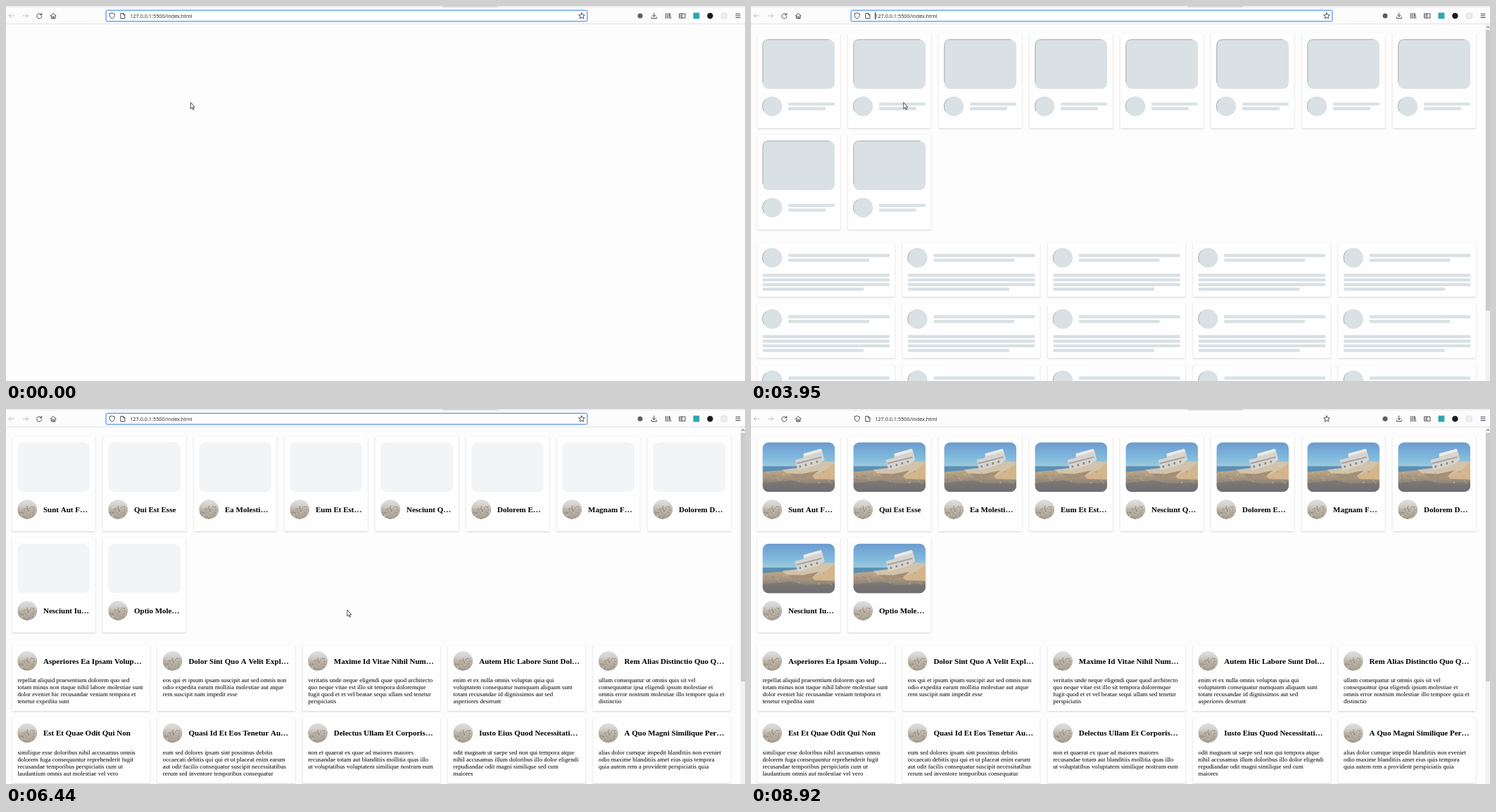
Animation of 1050 by 534 pixels, one loop 9.02 s. Source, as an HTML page:

```html
<!DOCTYPE html>
<html lang="en">
<head>
<meta charset="utf-8">
<title>Skeleton loading</title>
<style>
html, body { margin: 0; width: 100%; height: 100%; overflow: hidden; background: #fdfdfd; }
svg { display: block; width: 1050px; height: 534px; }
.url { font: 7.3px "Open Sans", "Noto Sans", sans-serif; fill: #222; }
.title { font: bold 11px "Liberation Serif", "Times New Roman", serif; }
.gap { font-weight: normal; } /* a different face keeps spaces out of kerning */
.text { font: 8.8px "Liberation Serif", "Times New Roman", serif; }
.card { fill: #fefefe; filter: drop-shadow(0 1.4px .8px rgba(0,0,0,.17)); }
.icon { fill: none; stroke: #4a4a52; stroke-width: 1; stroke-linecap: round; stroke-linejoin: round; }
.pale { stroke: #bdbdc3; }
.edge { fill: none; stroke: #8f9497; stroke-width: .7; }
</style>
</head>
<body>
<svg id="stage" viewBox="0 0 1050 534"></svg>
<script>
const LOOP = 9020;
const stage = document.getElementById("stage");

const topTitles = ["Sunt Aut F…", "Qui Est Esse", "Ea Molesti…", "Eum Et Est…", "Nesciunt Q…",
  "Dolorem E…", "Magnam F…", "Dolorem D…", "Nesciunt Iu…", "Optio Mole…"];

const posts = [
  ["Asperiores Ea Ipsam Volup…", "repellat aliquid praesentium dolorem quo sed|totam minus non itaque nihil labore molestiae sunt|dolor eveniet hic recusandae veniam tempora et|tenetur expedita sunt"],
  ["Dolor Sint Quo A Velit Expl…", "eos qui et ipsum ipsam suscipit aut sed omnis non|odio expedita earum mollitia molestiae aut atque|rem suscipit nam impedit esse"],
  ["Maxime Id Vitae Nihil Num…", "veritatis unde neque eligendi quae quod architecto|quo neque vitae est illo sit tempora doloremque|fugit quod et et vel beatae sequi ullam sed tenetur|perspiciatis"],
  ["Autem Hic Labore Sunt Dol…", "enim et ex nulla omnis voluptas quia qui|voluptatem consequatur numquam aliquam sunt|totam recusandae id dignissimos aut sed|asperiores deserunt"],
  ["Rem Alias Distinctio Quo Q…", "ullam consequatur ut omnis quis sit vel|consequuntur ipsa eligendi ipsum molestiae et|omnis error nostrum molestiae illo tempore quia et|distinctio"],
  ["Est Et Quae Odit Qui Non", "similique esse doloribus nihil accusamus omnis|dolorem fuga consequuntur reprehenderit fugit|recusandae temporibus perspiciatis cum ut|laudantium omnis aut molestiae vel vero"],
  ["Quasi Id Et Eos Tenetur Au…", "eum sed dolores ipsam sint possimus debitis|occaecati debitis qui qui et ut placeat enim earum|aut odit facilis consequatur suscipit necessitatibus|rerum sed inventore temporibus consequatur"],
  ["Delectus Ullam Et Corporis…", "non et quaerat ex quae ad maiores maiores|recusandae totam aut blanditiis mollitia quas illo|ut voluptatibus voluptatem similique nostrum eum"],
  ["Iusto Eius Quod Necessitati…", "odit magnam ut saepe sed non qui tempora atque|nihil accusamus illum doloribus illo dolor eligendi|repudiandae odit magni similique sed cum|maiores"],
  ["A Quo Magni Similique Per…", "alias dolor cumque impedit blanditiis non eveniet|odio maxime blanditiis amet eius quis tempora|quia autem rem a provident perspiciatis quia"]
];

// Shape helpers
const rect = (x, y, w, h, r = 0, extra = "") => `<rect x="${x}" y="${y}" width="${w}" height="${h}" rx="${r}" ${extra}/>`;
const circle = (x, y, r, extra = "") => `<circle cx="${x}" cy="${y}" r="${r}" ${extra}/>`;
const text = (x, y, cls, s) => `<text x="${x}" y="${y}" class="${cls}">${s}</text>`;
const title = (x, y, s) => text(x, y, "title", s.replaceAll(" ", '<tspan class="gap"> </tspan>'));
const icon = (d, cls = "") => `<path class="icon ${cls}" d="${d}"/>`;
const poly = (points, fill) => `<polygon points="${points}" fill="${fill}"/>`;
const use = (id, x, y) => `<use href="#${id}" x="${x}" y="${y}"/>`;
const bar = (x, y, w) => rect(x, y - 2.2, w, 4.4, 1.4);
const card = (x, y, w, h) => rect(x + .7, y, w - 1.4, h, 1.5, 'class="card"');
const grid = (n, cols, dx, dy, draw) =>
  Array.from({ length: n }, (_, i) => draw(i % cols * dx, Math.floor(i / cols) * dy, i)).join("");
const gradient = (id, ...stops) => `<linearGradient id="${id}" x1="0" y1="0" x2="0" y2="1">` +
  stops.map(([o, c]) => `<stop offset="${o}" stop-color="${c}"/>`).join("") + `</linearGradient>`;

let seed = 11;
const rnd = () => (seed = seed * 16807 % 2147483647) / 2147483647;

function specks(n, x, y, w, h, colors) {
  let out = "";
  for (let i = 0; i < n; i++) {
    const c = colors[i % colors.length];
    out += circle((x + rnd() * w).toFixed(1), (y + rnd() * h).toFixed(1), (.5 + rnd() * .5).toFixed(1), `fill="${c}"`);
  }
  return out;
}

const defs = `<defs>
  ${gradient("sky", [0, "#6c9bd0"], [.6, "#7fb9dc"], [1, "#a2cddb"])}
  ${gradient("sand", [0, "#c9b18e"], [.4, "#a99880"], [.75, "#807a75"], [1, "#737174"])}
  ${gradient("field", [0, "#e0e0e0"], [.3, "#d3d0cc"], [.5, "#bcb4a8"], [1, "#a69d91"])}
  <clipPath id="frame">${rect(0, 0, 102.5, 70.5, 8.8)}</clipPath>
  <clipPath id="disc">${circle(0, 0, 14)}</clipPath>
  <g id="ship" clip-path="url(#frame)">
    ${rect(0, 0, 103, 36, 0, 'fill="url(#sky)"')}
    ${rect(0, 34, 60, 9, 0, 'fill="#5c8fb4"')}
    ${poly("0,42 25,40 60,37 103,34 103,71 0,71", "url(#sand)")}
    ${poly("62,38 84,31 103,29 103,53 74,52", "#d3b68d")}
    ${poly("28,39 52,36 90,27 103,28 92,38 74,46 52,48 36,46", "#d2c3ab")}
    ${poly("34,44 56,45 80,40 70,48 48,52", "#a48f76")}
    ${poly("46,25 58,22 58,17 84,10 88,25 80,31 50,40", "#d5d4d1")}
    ${poly("58,16 83,9 84,13 59,20", "#eceae6")}
    ${poly("48,29 84,20 84,22 49,31", "#a9a39d")}
    ${[0, 1, 2, 3].map(i => rect(52 + i * 8, 33 - i * 2.3, 2.6, 3, 0, 'fill="#8d867f"')).join("")}
    ${poly("0,58 40,54 62,59 103,57 103,71 0,71", "rgba(108,108,114,.5)")}
    ${specks(30, 3, 42, 96, 16, ["#d0bb99", "#8b7c69", "#bda581"])}
  </g>
  <g id="face" clip-path="url(#disc)">
    ${circle(0, 0, 14, 'fill="url(#field)"')}
    ${specks(56, -13, -4, 26, 17, ["#8d8477", "#d2cabc", "#9b9082"])}
  </g>
</defs>`;

const toolbar = `
  ${rect(0, 0, 1050, 25, 0, 'fill="#fcfcfd"')}
  ${rect(0, 0, 1050, 2, 0, 'fill="#eeeef0"')}
  ${rect(620, 0, 79, 2, 1, 'fill="#d8d8dc"')}
  ${rect(0, 25, 1050, 1, 0, 'fill="#e3e3e7"')}
  ${rect(39, 5, 17, 17, 2, 'id="hover" fill="#dbdbe1"')}
  <g id="focus">${rect(141.5, 5.5, 685, 17, 2, 'fill="none" stroke="#a9c7f6"')}
  ${rect(142.5, 6.5, 683, 15, 1.5, 'fill="#fff" stroke="#7ba9f0"')}</g>
  ${icon("M11.5 14H4.2M7 11L4 14L7 17", "pale")}
  ${icon("M24.3 14H31.5M28.7 11L31.7 14L28.7 17", "pale")}
  <g id="reload">${icon("M50.2 12.2A3.6 3.6 0 1 0 50.9 14.8M50.8 10.3V12.8H48.3")}</g>
  <g id="stop">${icon("M44.3 11L50.3 17M50.3 11L44.3 17")}</g>
  ${icon("M63.3 14L67.2 10.3L71 14M64.4 13.5V17.8H70V13.5M66.3 17.6V15H68.1V17.6")}
  ${icon("M150.8 9.9L154.5 11.2C154.6 14.6 153.3 17 150.8 18.2C148.3 17 147 14.6 147.1 11.2Z")}
  ${icon("M163.2 10.4H166.8L168.9 12.5V17.7H163.2ZM166.6 10.5V12.7H168.8")}
  ${icon("M818 9.8L819.3 12.5L822.2 12.9L820 14.9L820.6 17.9L818 16.4L815.4 17.9L816 14.9L813.8 12.9L816.7 12.5Z")}
  ${circle(901, 14, 3.5, 'fill="#5c5c64"')}
  ${icon("M920.8 10V15M918.5 13L920.8 15.2L923.1 13M917.3 15.8V17.7H924.3V15.8")}
  ${icon("M937.6 10.4V17.6M939.9 10.4V17.6M942.2 10.4V17.6M943 10.6L944.6 17.6")}
  ${icon("M957 11H965V17H957ZM960.3 11V17M958.2 13H959M958.2 14.7H959")}
  ${rect(976.5, 9.5, 8.8, 8.8, 0, 'fill="#2fa6b2"')}
  ${circle(1000.4, 14, 4.2, 'fill="#1b1b1f"')}
  ${rect(1016.3, 10, 8, 8, 1.5, 'fill="#eeeef0" stroke="#d8d8dc" stroke-width=".8"')}
  ${icon("M1037 11.3H1043M1037 13.9H1043M1037 16.5H1043")}
  ${text(176.2, 17, "url", "127.0.0.1:5500/index.html")}
  ${rect(176, 9, 1, 10, 0, 'id="caret" fill="#222"')}`;

const topCards = grid(10, 8, 129, 144.3, (x, y) => card(8 + x, 39 + y, 119.5, 135));
const faceRow = draw => grid(10, 8, 129, 144.3, (x, y, i) => draw(30.2 + x, 142.9 + y, i));
const postRow = draw => grid(10, 5, 206.4, 102.6, (x, y, i) => draw(30.2 + x, 358.8 + y, i));
const arc = (x, y) => `<path class="edge" d="M${x - 9} ${y - 10.5}A13.8 13.8 0 0 0 ${x - 12} ${y + 7}"/>`;

const skeleton = `<g id="skeleton">
  ${topCards}
  ${grid(15, 5, 206.4, 87.2, (x, y) => card(8 + x, 337 + y, 197, 77))}
  <g id="bones">
  ${grid(10, 8, 129, 144.3, (x, y) => rect(16.5 + x, 47.5 + y, 102.5, 70.5, 8.8) + circle(30.2 + x, 142.9 + y, 14)
    + bar(53 + x, 139.6 + y, 66) + bar(53 + x, 146.3 + y, 53))}
  ${grid(15, 5, 206.4, 87.2, (x, y) => circle(30.2 + x, 358.6 + y, 14) + bar(53 + x, 355.3 + y, 144) + bar(53 + x, 362 + y, 115)
    + [0, 1, 2, 3].map(i => bar(16.5 + x, 383.5 + y + i * 6.6, i < 3 ? 180.5 : 144)).join(""))}
  </g>
  ${grid(10, 8, 129, 144.3, (x, y) =>
    `<path class="edge" d="M${16.8 + x} ${109 + y}V${56 + y}Q${17 + x} ${47.8 + y} ${25 + x} ${47.8 + y}H${111 + x}"/>` + arc(30.2 + x, 142.9 + y))}
  ${grid(15, 5, 206.4, 87.2, (x, y) => arc(30.2 + x, 358.6 + y))}
</g>`;

const page = `<g id="page">
  ${topCards}
  ${grid(10, 5, 206.4, 102.8, (x, y) => card(8 + x, 337 + y, 197, 93))}
  <g id="boxes">${grid(10, 8, 129, 144.3, (x, y) => rect(16.5 + x, 47.5 + y, 102.5, 70.5, 8.8))}</g>
  <g id="discs">${faceRow((x, y) => circle(x, y, 14))}${postRow((x, y) => circle(x, y, 14))}</g>
  <g id="ships">${grid(10, 8, 129, 144.3, (x, y) => use("ship", 16.5 + x, 47.5 + y))}</g>
  <g id="topFaces">${faceRow((x, y) => use("face", x, y))}</g>
  <g id="postFaces">${postRow((x, y) => use("face", x, y))}</g>
  ${faceRow((x, y, i) => title(x + 22.8, y + 3.9, topTitles[i]))}
  ${postRow((x, y, i) => title(x + 22.8, y + 3.9, posts[i][0])
    + posts[i][1].split("|").map((line, k) => text(x - 13.8, y + 30.6 + k * 10, "text", line)).join(""))}
</g>`;

const scrollbar = `<g id="scroll">${rect(1043.5, 26, 6.5, 508, 0, 'fill="#f2f2f2"')}
  ${rect(1044, 34, 6, 400, 0, 'id="thumb" fill="#cbcbcb"')}
  <path d="M1044.8 31.2L1047 28.9L1049.2 31.2" fill="none" stroke="#555"/></g>`;

const pointer = `
  <path id="arrow" d="M.3 .3V9.4L2.3 7.6L3.7 10.7L5 10.1L3.6 7.1H6.2Z" fill="#fff" stroke="#222" stroke-width=".8"/>
  <path id="beam" d="M215.8 134H219.2M217.5 134V142.6M215.8 142.6H219.2" fill="none" stroke="#333" stroke-width=".9"/>`;

stage.innerHTML = defs + toolbar + skeleton + page + scrollbar + pointer;

const el = {};
stage.querySelectorAll("[id]").forEach(e => el[e.id] = e);
const show = (id, on) => el[id].setAttribute("display", on ? "inline" : "none");

// Pointer moves: first step, last step, number of steps, end point
const moves = [
  [1380, 1860, 5, 60, 1], [2000, 2130, 2, 51, 16], [2500, 2500, 1, 117, 89],
  [2650, 2770, 2, 207, 138], [2920, 3040, 2, 208, 138], [3440, 3440, 1, 211, 138],
  [3590, 3830, 3, 216.5, 137], [5560, 5930, 4, 270, 150], [6080, 6200, 2, 426, 248],
  [6440, 6800, 4, 660, 399], [6950, 7310, 4, 876, 504], [7460, 7460, 1, 943, 519],
  [7580, 7580, 1, 1010, 560]
];

function pointerAt(t) {
  let x = 262, y = 137;
  for (const [start, end, n, tx, ty] of moves) {
    if (t < start) break;
    const gap = n > 1 ? (end - start) / (n - 1) : 1;
    const k = Math.min(n, Math.floor((t - start) / gap + 1e-6) + 1) / n;
    x += (tx - x) * k;
    y += (ty - y) * k;
  }
  return [x, y];
}

const blinks = [510, 1100, 1620, 2130, 2650, 3190, 3710, 4200, 4700, 5300, 5800, 6200, 6800, 7310, 7820, 8420];
const between = (t, a, b = LOOP) => t >= a && t < b;

function pulse(t) {
  const age = (3590 + Math.floor((t - 3590) / 120) * 120 - 3450) / 1000;
  return `hsl(200 18% ${80 + 15 * age}%)`;
}

function render(t) {
  const [x, y] = pointerAt(t);
  const beam = between(t, 4070, 5560);
  el.arrow.setAttribute("transform", `translate(${x} ${y})`);
  show("arrow", !beam);
  show("beam", beam);
  show("caret", blinks.filter(b => b <= t).length % 2 && t < 8920);
  show("focus", t < 8920);
  show("hover", between(t, 2000, 2500));
  show("stop", between(t, 2500, 2650));
  show("reload", !between(t, 2500, 2650));

  show("skeleton", between(t, 3590, 4070));
  if (between(t, 3590, 4070)) el.bones.setAttribute("fill", pulse(t));
  show("scroll", t >= 3590);
  el.thumb.setAttribute("height", t < 4070 ? 400 : 354);

  const dark = "#c1ced5", light = "#f3f4f6";
  show("page", t >= 4070);
  el.boxes.setAttribute("fill", between(t, 4200, 7820) ? light : dark);
  el.discs.setAttribute("fill", t < 4200 ? dark : light);
  show("postFaces", t >= 4450);
  show("topFaces", t >= 4940);
  show("ships", t >= 7940);
}

const begin = performance.now();
function tick() {
  render((performance.now() - begin) % LOOP);
  requestAnimationFrame(tick);
}
tick();
</script>
</body>
</html>
```
